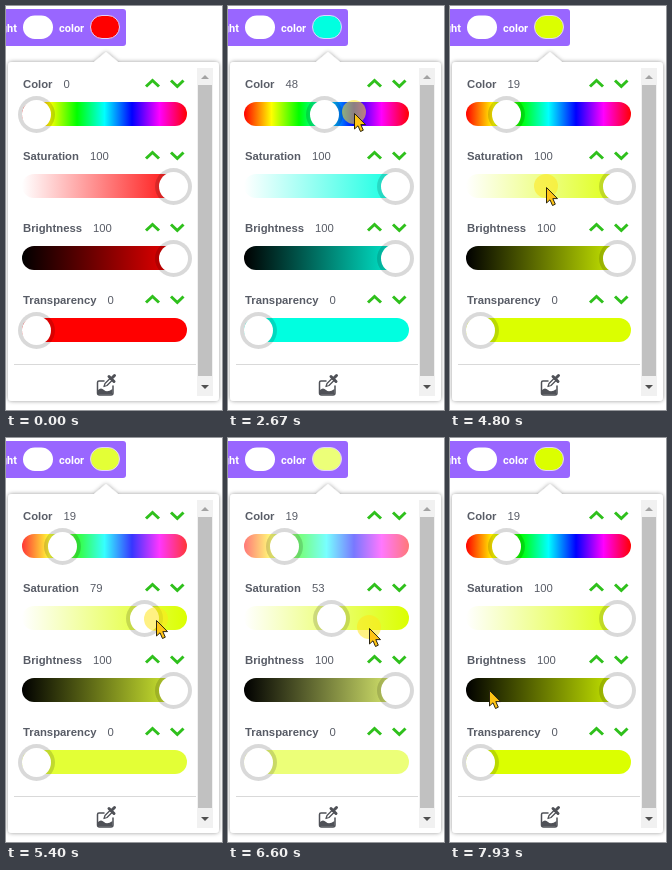
An HTML page for the animation above (8000 ms loop, 216 by 404 pixels).

```html
<!DOCTYPE html>
<html lang="en">
<head>
<meta charset="utf-8">
<title>Color picker</title>
<style>
html, body { margin: 0; width: 100%; height: 100%; overflow: hidden; background: #fff; }
#stage { position: relative; width: 216px; height: 404px; overflow: hidden; font-family: "Liberation Sans", Arial, sans-serif; }
#stage > svg { position: absolute; left: 0; top: 0; }
.row { position: absolute; left: 0; width: 190px; height: 72px; }
.label { position: absolute; left: 17px; top: 7px; font-size: 11.3px; line-height: 13px; color: #585c66; white-space: nowrap; }
.label span { margin-left: 11px; }
.row svg { position: absolute; left: 0; top: 0; }
.track { position: absolute; left: 16px; top: 31px; width: 165px; height: 24px; border-radius: 12px; }
.knob { position: absolute; left: 0; top: 28.5px; width: 29px; height: 29px; margin-left: -14.5px; border-radius: 50%; background: #fff; box-shadow: 0 0 0 4px rgba(0, 0, 0, .15); }
</style>
</head>
<body>
<div id="stage">
  <svg width="216" height="404">
    <defs>
      <filter id="shade" x="-10%" y="-10%" width="120%" height="120%">
        <feDropShadow dx="0" dy="0" stdDeviation="2" flood-color="#000" flood-opacity=".4"/>
      </filter>
    </defs>
    <path d="M0 3H117Q120 3 120 6V37Q120 40 117 40H0Z" fill="#96f"/>
    <g fill="#fff" font-family="Roboto, Arial, sans-serif" font-size="11" font-weight="700">
      <text x="11" y="26" text-anchor="end">light</text>
      <text x="53" y="26">color</text>
    </g>
    <rect x="17" y="9.5" width="30" height="23.5" rx="11.75" fill="#fff"/>
    <rect id="swatch" x="84.5" y="9.5" width="29" height="23" rx="11.5" stroke="#e0d2ff"/>
    <path d="M6 56H88L100 46L112 56H209Q213 56 213 60V391Q213 395 209 395H6Q2 395 2 391V60Q2 56 6 56Z" fill="#fff" filter="url(#shade)"/>
    <rect x="191" y="62" width="16" height="328" fill="#f1f1f1"/>
    <rect x="192" y="79" width="14" height="291" fill="#c1c1c1"/>
    <path d="M195 73L199 69L203 73Z" fill="#a3a3a3"/>
    <path d="M195 379L199 383L203 379Z" fill="#505050"/>
    <path d="M8 358.5H190" stroke="#d9d9d9"/>
    <g fill="none" stroke="#4f5157" stroke-linecap="round" stroke-linejoin="round">
      <path d="M98 375H93Q91.500 375 91.500 376.500V387Q91.500 389 93.500 389H105Q107 389 107 387V380" stroke-width="1.500"/>
      <path d="M92 384Q95 381 98 384T106.500 383V388.500H92Z" fill="#4f5157" stroke="none"/>
      <path d="M98 380.500L99 377.500L104 372.500L106 374.500L101 379.500Z" stroke-width="1.300"/>
      <path d="M103 370.500L108 375.500M105.500 372.500L108.500 369.500" stroke-width="3"/>
    </g>
  </svg>
  <svg id="pointer" width="216" height="404">
    <g id="mouse">
      <circle id="press" cy="-1" r="12" fill="#ffe61e" fill-opacity=".55"/>
      <path d="M.5 .5V16L4 12.800L6.500 18.500L9.300 17.200L6.800 11.600H11.500Z" fill="#ffc414" stroke="#2a2410" stroke-linejoin="round"/>
    </g>
  </svg>
</div>
<script>
const $ = id => document.getElementById(id);
const FPS = 15, LOOP = 8000, LAG = 2;
const knobX = v => 30.5 + 1.37 * v;

const rows = ['Color', 'Saturation', 'Brightness', 'Transparency'].map((name, i) => {
  const row = document.createElement('div');
  row.className = 'row';
  row.style.top = 65 + 72 * i + 'px';
  row.innerHTML = `<div class="label"><b>${name}</b><span></span></div>
    <svg width="190" height="30" fill="none" stroke="#2fc01c" stroke-width="3">
      <path d="M140 15.500L146.500 9.500L153 15.500M165 9.500L171.300 15.500L177.500 9.500"/>
    </svg>
    <div class="track"></div><div class="knob"></div>`;
  $('stage').insertBefore(row, $('pointer'));
  const find = q => row.querySelector(q);
  return { text: find('span'), track: find('.track'), knob: find('.knob') };
});

// All channels run from 0 to 100.
function hsv(h, s, v) {
  const part = n => {
    const k = (n + h * 0.06) % 6;
    return Math.round(2.55 * v * (1 - s / 100 * Math.max(0, Math.min(k, 4 - k, 1))));
  };
  return `rgb(${part(5)},${part(3)},${part(1)})`;
}
const ramp = colors => `linear-gradient(90deg,${colors.join()})`;

// Pointer path: step, x, y, eased
const path = [
  [6, 212, 412], [14, 28, 90, 1], [15, 28, 90], [23, 98, 108, 1], [33, 98, 108],
  [35, 79, 106], [38, 126, 107, 1], [43, 126, 107], [47, 57, 106, 1], [48, 57, 106],
  [49, 56, 105], [55, 56, 105], [63, 75, 150, 1], [64, 75, 150], [70, 96, 181, 1],
  [74, 96, 181], [81, 150, 182, 1], [85, 150, 182], [88, 69, 181], [90, 17, 180],
  [92, 12, 180], [93, 12, 180], [97, 103, 186], [99, 141, 190], [102, 168, 190],
  [104, 184, 187], [107, 184, 187], [119, 39, 252, 1]
];
const presses = [[25, 29], [40, 43], [52, 55], [72, 104]];

function pointerAt(step) {
  const i = path.findIndex(p => p[0] >= step);
  if (i < 1) return path[0].slice(1, 3);
  const a = path[i - 1], b = path[i];
  let u = (step - a[0]) / (b[0] - a[0]);
  if (b[3]) u = u * u * (3 - 2 * u);
  return [a[1] + (b[1] - a[1]) * u, a[2] + (b[2] - a[2]) * u];
}

const hueAt = step => step < 27 ? 0 : step < 41 ? 48 : step < 53 ? 70 : 19;

function satAt(step) {
  if (step < 72 + LAG || step >= 104) return 100;
  const x = pointerAt(step - LAG)[0];
  return Math.max(0, Math.min(100, Math.round((x - 30.5) / 1.37)));
}

function draw(step) {
  const h = hueAt(step), s = satAt(step), color = hsv(h, s, 100);
  const fills = [
    ramp([0, 1, 2, 3, 4, 5, 6].map(n => hsv(n * 100 / 6, s, 100))),
    ramp(['#fff', hsv(h, 100, 100)]),
    ramp(['#000', color]),
    color
  ];
  [h, s, 100, 0].forEach((v, i) => {
    rows[i].text.textContent = v;
    rows[i].track.style.background = fills[i];
    rows[i].knob.style.left = knobX(v) + 'px';
  });
  $('swatch').setAttribute('fill', color);
  const [x, y] = pointerAt(step);
  $('mouse').setAttribute('transform', `translate(${x.toFixed(1)} ${y.toFixed(1)})`);
  $('mouse').style.display = step < 7 ? 'none' : '';
  $('press').style.display = presses.some(([a, b]) => step >= a && step < b) ? '' : 'none';
}

const start = performance.now();
let last = 0;
function tick() {
  const t = (performance.now() - start) % LOOP;
  const step = Math.min(119, Math.floor((t + 5) * FPS / 1000));
  if (step !== last) draw(last = step);
  requestAnimationFrame(tick);
}
draw(0);
requestAnimationFrame(tick);
</script>
</body>
</html>
```
